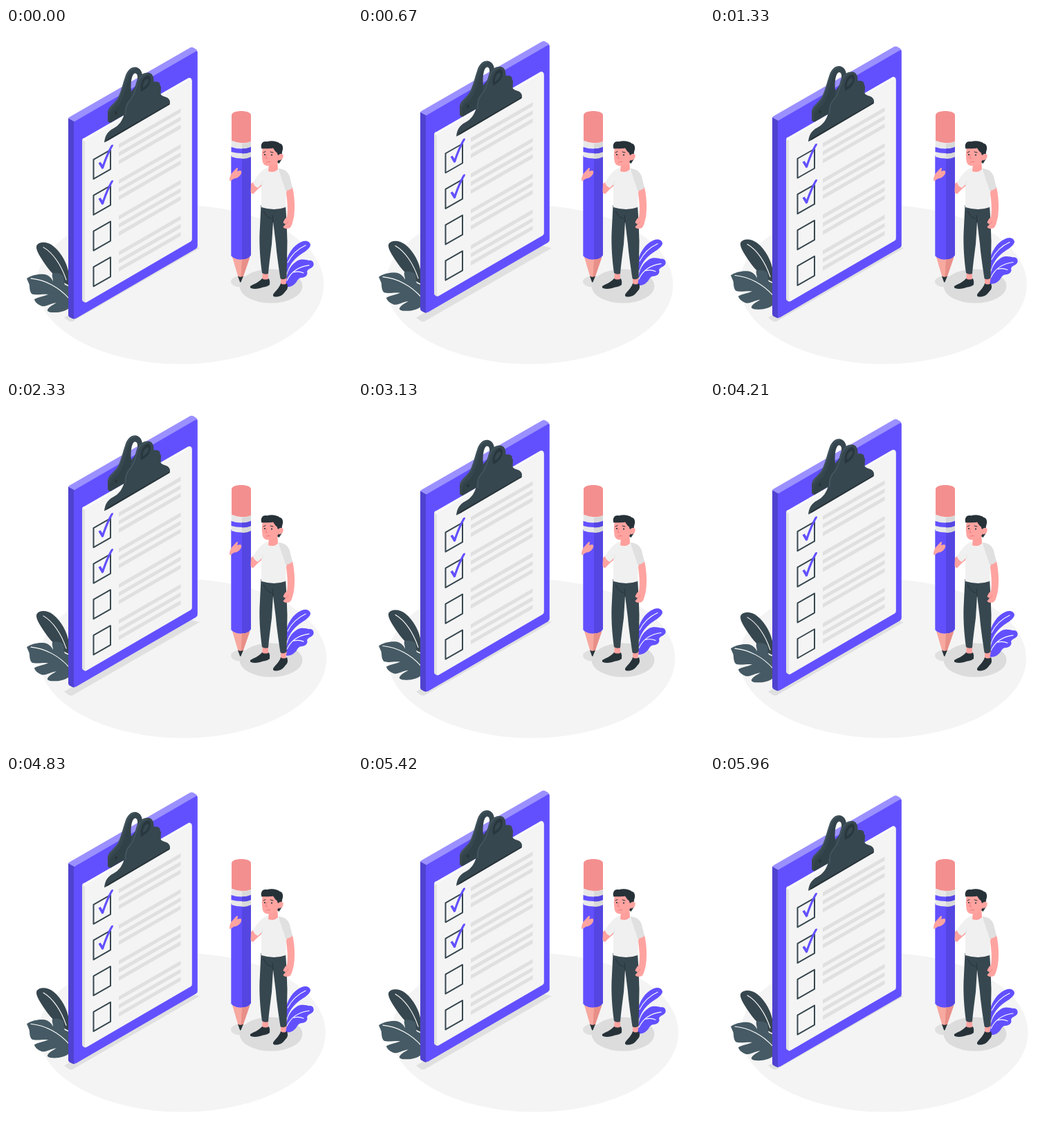
These frames come from a looping animation (500 by 500 pixels, 6000 ms). An HTML page:

```html
<!DOCTYPE html>
<html lang="en">
<head>
<meta charset="utf-8">
<title>Checklist</title>
<style>
  html, body { margin: 0; width: 100%; height: 100%; overflow: hidden; background: #fff; }
  svg { display: block; width: 100%; height: 100%; }
  .vein { fill: none; stroke: #fff; stroke-width: 1.1; stroke-linecap: round; }
  .box { fill: none; stroke: #37474f; stroke-width: 2; stroke-linejoin: round; }
</style>
</head>
<body>
<svg viewBox="0 0 500 500">
  <ellipse id="floor" cx="251.7" cy="370.8" rx="207.5" ry="114.8" fill="#f4f4f4"/>

  <g fill="#e0e0e0">
    <path d="M84 418.5L264 314L280 318L96 424Q93 425 90 423Z"/>
    <ellipse cx="339" cy="366.5" rx="14" ry="8"/>
    <ellipse cx="383" cy="373" rx="45.5" ry="24.5" fill="#dcdcdc"/>
  </g>

  <g class="plant">
    <path fill="#37474f" d="M91 372C78 366 65 354 57 342C48 329 42 319 44.5 314C49 308 60 309 68 315C81 325 89 342 91 356Z"/>
    <path class="vein" d="M54 317C68 325 80 343 87 364"/>
    <path fill="#455a64" d="M30 362C37 357 47 355 56 356C61 357 66 361 68 366C68 362 66 358 67 355C73 353 79 355 83 358C84 362 83 366 85 371L92 374V404C87 409 76 412 67 411C62 411 59 409 60 407C63 402 68 400 73 397C64 398 58 403 52 402C46 400 41 395 41 392C46 389 54 388 61 385C52 384 43 387 37 384C33 379 35 373 33 369Z"/>
    <path class="vein" d="M36 362C57 364 77 375 91 391"/>
  </g>

  <g class="plant" fill="#6250ff">
    <path d="M403 345C406 327 415 314 427 309C434 306 440 309 440 314C438 321 428 325 421 331C414 337 409 344 406 354Z"/>
    <path class="vein" d="M407 339C413 327 422 319 433 314"/>
    <path d="M404 374C404 357 409 344 420 337C426 333 434 335 438 336C443 335 446 340 444 344C441 348 436 348 435 352C437 357 432 361 426 361C421 362 421 367 417 370C413 374 408 375 404 374Z"/>
    <path class="vein" d="M406 365C412 352 423 345 438 343M416 353Q423 351 430 354"/>
  </g>

  <g id="board">
    <path fill="#9b90ff" d="M90 131.5Q90 130 92 129L266 28.8Q268.5 27.6 271 29L275 31.5Q277 33 276.5 36L98 139Z"/>
    <path fill="#4f42d0" d="M90 131L99 136V421Q97 421 95 420L91.5 418Q90 417 90 415Z"/>
    <path fill="#6250ff" d="M98 138.5Q98 136 100.5 134.7L274 34.3Q276.8 33 276.8 36V315.5Q276.8 318 274.5 319.4L101.5 419.8Q98 421.6 98 417.5Z"/>
    <path fill="#e3e3e3" d="M110 163Q110 160.5 112 159.5L116 160L115 397.5L112 396Q110 395 110 393Z"/>
    <path fill="#fafafa" d="M110.5 162Q111 160.6 113 159.5L263 73Q265 71.8 267 73L268.5 74.5L114 164.5Z"/>
    <path fill="#f4f4f4" d="M114 165.5Q114 163 116 161.8L266 75Q268.8 73.6 268.8 76.5V305.5Q268.8 308 267 309L117 396.3Q114 398 114 395Z"/>
    <g id="rows"></g>

    <path fill="#37474f" fill-rule="evenodd" d="M147 134V121C149 113 158 109 162.5 100C167 90 169 80 172.5 70C175.5 61 181 56.6 187 56.8C193.5 57.6 197 63 197 70L193 90L178 122L151 137.5Q147 137 147 134ZM181 92C180 82 181 68 186 66C191 65 191 74 188.5 81C186 87 184 89 181 92Z"/>
    <path fill="#263238" opacity=".3" d="M151 137.5C148 130 151 121 158 117C165 112 169 101 172 92C176 78 178 67 183 64C180 73 179 82 181 92L178 121Z"/>
    <path fill="#37474f" d="M142 166C143 156 147 150 154.5 146C164 141 168 134 170.5 126C171 118 172 111 178 104C185 96 186 86 189 77C192 69 198 65 205 65C210 65 214 69 213.5 78L218 78Q223 79 222.5 83L224 86L223.5 96C225.5 99.5 230 99.5 233.5 101.5Q238 105 236.7 109.5L147 162Z"/>
    <path fill="#263238" d="M142 166L147 161L236.7 108.8Q237.3 110.3 236 111.3L148 163Z"/>
    <path fill="#263238" opacity=".75" d="M195 91C193 82 198 71 204 69C209 68 210 74 208 80C205 88 200 89 195 93Z"/>
    <path fill="#37474f" d="M198 87C197 80 201 74 205 74C208 75 206 82 198 87Z"/>
    <path fill="none" stroke="#455a64" stroke-width="1.3" d="M148 122C150 114 159 110 163 101C168 91 170 79 174 70C177 62 182 58.5 187 58.5M173 126C172 116 174 110 180 104C187 96 187 86 191 77C194 70 199 67 204 66.5"/>
    <ellipse cx="159" cy="123" rx="1.5" ry="2.3" fill="#263238"/>
  </g>

  <g id="pencil">
    <path fill="#6250ff" d="M325.3 184H354V328Q350 335 340 335Q329 335 325.3 329Z"/>
    <path fill="#5546e2" d="M341 186H354V328Q350 335 341 335Z"/>
    <path fill="#f48f8f" d="M326 126C326 118 354 118 354 126V165Q340 169 326 164Z"/>
    <path fill="#e8e8e8" d="M325.7 162.5Q340 169 354 164V186Q340 191 325.7 186Z"/>
    <path fill="#d8d8d8" d="M341 167Q349 167 354 164V186Q349 189 341 189Z"/>
    <path fill="#6250ff" d="M325.5 172Q340 177 354 172V179Q340 183 325.5 179Z"/>
    <path fill="#5546e2" d="M341 174.5Q349 174.5 354 172V179Q349 181.5 341 181.5Z"/>
    <path fill="#f7a9a0" d="M327 331Q333 335 340 334.6Q348 334.5 352.5 331L342.5 360H335.5Z"/>
    <path fill="#e88f88" d="M341 334.6Q348 334.5 352.5 331L342.5 360H339.5Z"/>
    <path fill="#263238" d="M335 358.5Q339 361 343 358.5L339.5 367Q338.8 368 338 367Z"/>
  </g>

  <g id="man">
    <g fill="#ffa3a0">
      <path d="M354 225Q362 219 369 217L371 227Q363 233 357 240Q354 239 353.5 237Z"/>
      <path d="M323 221C323 215 325 211 328 208L333 202.5Q335 201 335 204L334 207L338 206Q341 206 340 210Q338 215 333 217Q329 217 326 220Z"/>
      <path d="M371 352H379L379 364Q375 367 370 364ZM397 360H406L404 371Q400 374 397 370Z"/>
    </g>
    <g fill="#263238">
      <path d="M353 373C358 370 365 368 370 362Q375 365 380 362Q382 366 381 371C376 375 371 374 367 376Q357 378 353 375.5Z"/>
      <path d="M386 385C390 379 395 376 397 369Q401 372 406 369Q408 374 406 378C403 381 401 385 397 387Q388 390 386 387Z"/>
    </g>
    <path fill="#37474f" d="M368.5 256H404C405.5 277 406 293 406.5 308L405.5 361Q401 365 396.5 362C394 345 391 325 390 312L386 280L384 312C382 328 380 342 379 355Q374 357 370 354C367 333 366 313 366.5 297Z"/>
    <path fill="none" stroke="#263238" stroke-width="1" d="M386 281L385 270M372 264Q376 273 384 276"/>
    <path fill="#ffa3a0" d="M404 232L414 230C417 243 418 259 416 273C414 281 413 288 409 289.5Q402 291 400.5 287.5L404 283.5L400.5 281.5Q402 276 406 273C408 260 406 246 404 232Z"/>
    <path fill="none" stroke="#e97d7d" stroke-width=".8" d="M404 283.5Q407 282 408 279"/>

    <path fill="#f0f0f0" d="M377 202Q385 207 394 203L404 206C408 217 407 229 405 239L404 259Q388 265 369 259L369 226L364 231Q358 228 357 223C362 215 367 207 377 202Z"/>
    <path fill="#e0e0e0" d="M394 203C403 204 408 208 410 215L414 231Q409 235 404 235C402 226 396 214 394 203Z"/>
    <path fill="#e3e3e3" d="M369 226L372 219L370 229Z"/>

    <path fill="#ff9f9c" d="M380 195L392 188L393 204Q388 210 379 207Z"/>
    <path fill="#263238" d="M391 184H398L399 189L394.5 196L391 193Z"/>
    <path fill="#ffa3a0" d="M371 174Q380 170 394 174L394 190C392 196 386 199 380 199Q373 200 371 194C370 188 369 181 371 174Z"/>
    <path fill="#263238" d="M369.5 174.5C367 168 371 162.5 377 164.3C383 162.3 391 163 396 167C400.5 168 401 174 399 179L398.5 184H393L391.5 180C389 179 388 176 386 173.5C380 174.8 374 173.8 369.5 174.5Z"/>
    <path fill="#ffa3a0" d="M393 184Q398 180 400.7 183.5Q401.5 189.5 395 191.5Q392 190 393 184Z"/>
    <g fill="none" stroke="#263238" stroke-linecap="round" stroke-width="1">
      <path d="M372 180L375 178.5M382 179L386 180"/>
      <path stroke="#e97d7d" d="M377 183L375 188L378 188.5M376 194Q379 192.5 382 193.5"/>
    </g>
    <circle cx="374" cy="183" r="1.1" fill="#263238"/>
    <circle cx="384" cy="183.5" r="1.1" fill="#263238"/>
  </g>
</svg>
<script>
  const pick = s => document.querySelector(s);
  const board = pick('#board'), floor = pick('#floor');
  const plants = document.querySelectorAll('.plant');

  const bar = y => `<path fill="#e0e0e0" d="M163 ${y}L252.5 ${y - 51.6}V${y - 45.8}L163 ${y + 5.8}Z"/>`;
  const check = '<path fill="#6250ff" d="M133.5 195.6L136.6 193.8L139.4 198C143 188 147.5 177 152.2 169.3L155 168.8L154.8 170.8C149.5 180 144.5 192 141 203.3L138.6 204.2Z"/>';

  // Each row: three slanted text bars, a box, and a tick in the first two.
  pick('#rows').innerHTML = [0, 1, 2, 3].map(i =>
    `<g transform="translate(0 ${i * 51.7})">
      ${[168.2, 180, 191.6].map(bar).join('')}
      <path class="box" d="M126.5 190.6L151 176.6V204.6L126.5 218.6Z"/>
      ${i < 2 ? check : ''}
    </g>`).join('');

  // Linear rise of 10 px and back over one period.
  const float = (t, period) => {
    const p = t % period / period;
    return `translate(0 ${-10 * (1 - Math.abs(1 - 2 * p))})`;
  };

  const LEAD = 30;

  function draw(t) {
    board.setAttribute('transform', float(t + LEAD, 1500));
    plants.forEach(p => p.setAttribute('transform', float(t + LEAD, 6000)));
    const sway = -4 * Math.sin(2 * Math.PI * t / 3000);
    floor.setAttribute('transform', `translate(${sway} 0)`);
  }

  const start = performance.now();
  function tick() {
    draw((performance.now() - start) % 6000);
    requestAnimationFrame(tick);
  }
  tick();
</script>
</body>
</html>
```
